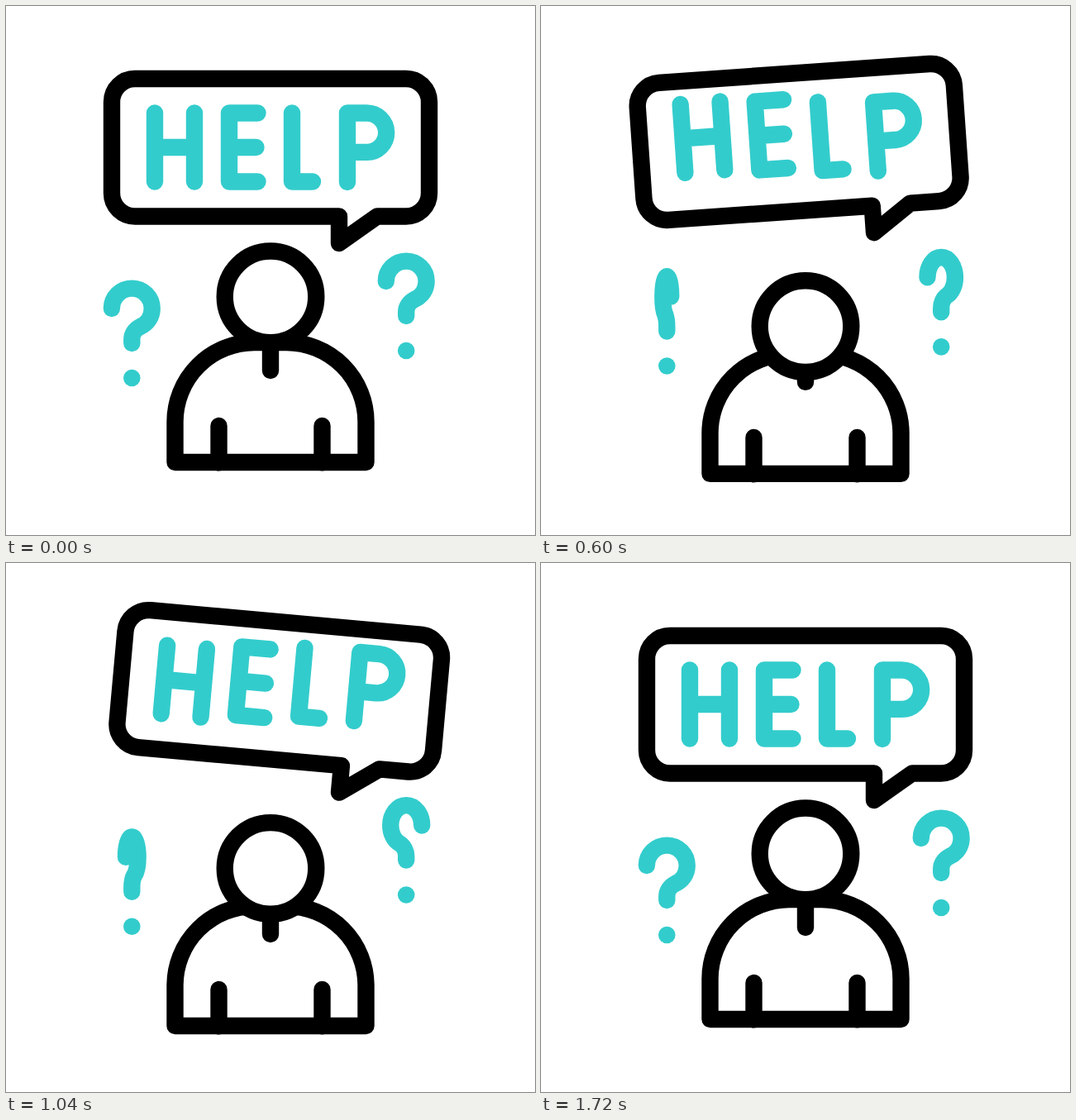
An HTML page that plays this animation: 640x640 px, repeating every 2000 ms.

```html
<!DOCTYPE html>
<html lang="en">
<head>
<meta charset="utf-8">
<title>Help</title>
<style>
  html, body { margin: 0; width: 100%; height: 100%; overflow: hidden; background: #fff; }
  svg { display: block; width: 100%; height: 100%; }

  .ink, .tint { fill: none; stroke-width: 20.4; stroke-linecap: round; stroke-linejoin: round; }
  .ink { stroke: #000; }
  .tint { stroke: #3cc; }
  .dot { fill: #3cc; stroke: none; }

  .bubble, .hop, .head, .body, .mark, .hook {
    animation: 2s cubic-bezier(.333, 0, .667, 1) var(--delay, 0s) infinite;
  }
  .bubble { transform-origin: 403px 287px; animation-name: lift, tilt; }
  .hop { animation-name: hop; }
  .head { animation-name: nod; }
  .body { animation-name: sink; }
  .mark { animation-name: bob; }
  .hook {
    animation-name: flip;
    d: path("M-24.4 0C-24.4 -13.5 -13.5 -24.4 0 -24.4C13.5 -24.4 24.4 -13.5 24.4 0C24.4 10 18.5 18.5 10 22C4 25 0 31 0 37L0 42");
  }

  @keyframes lift {
    0%, 7.25%, 73%, 100% { translate: 0 0; }
    31.75%, 41% { translate: 0 -13px; }
  }
  @keyframes tilt {
    0%, 74.5%, 100% { rotate: 0deg; }
    24%, 25.5% { rotate: -4.9deg; }
    50%, 53% { rotate: 5.15deg; }
  }
  @keyframes hop {
    0%, 8%, 55.5%, 100% { translate: 0 0; }
    29%, 35% { translate: 0 -13.7px; }
  }
  @keyframes nod {
    0%, 9%, 64%, 100% { translate: 0 0; }
    31%, 39.75% { translate: 0 36px; }
  }
  @keyframes sink {
    0%, 9%, 65.75%, 100% { translate: 0 0; }
    31%, 40.75% { translate: 0 14px; }
  }
  @keyframes bob {
    0%, 9%, 67.25%, 100% { translate: 0 0; }
    34%, 42.25% { translate: 0 -15.5px; }
  }
  /* The hook mirrors about its stem while the stroke keeps its weight. */
  @keyframes flip {
    0%, 8%, 68%, 100% {
      d: path("M-24.4 0C-24.4 -13.5 -13.5 -24.4 0 -24.4C13.5 -24.4 24.4 -13.5 24.4 0C24.4 10 18.5 18.5 10 22C4 25 0 31 0 37L0 42");
      animation-timing-function: ease-in;
    }
    38% {
      d: path("M24.4 0C24.4 -13.5 13.5 -24.4 0 -24.4C-13.5 -24.4 -24.4 -13.5 -24.4 0C-24.4 10 -18.5 18.5 -10 22C-4 25 0 31 0 37L0 42");
      animation-timing-function: ease-out;
    }
  }
</style>
</head>
<body>
<svg viewBox="0 0 640 640" role="img" aria-label="HELP">
  <g class="bubble">
    <path class="ink" d="M156 88H484a28 28 0 0 1 28 28V226.5a28 28 0 0 1-28 28H449L403 287V254.5H156a28 28 0 0 1-28-28V116a28 28 0 0 1 28-28Z"/>
    <g class="tint">
      <path class="hop" d="M180 129.5V212.5M228 129.5V212.5M180 171H228"/>
      <path class="hop" style="--delay:.148s" d="M304.5 129.5H270V212.5H304.5M270 171H302.5"/>
      <path class="hop" style="--delay:.275s" d="M346 129.5V212.5H371"/>
      <path class="hop" style="--delay:.438s" d="M413 213V129.5H436.5a23.7 23.7 0 0 1 0 47.4H413"/>
    </g>
  </g>

  <g class="ink body">
    <path d="M204.5 552V503a96 96 0 0 1 96-96H339.5a96 96 0 0 1 96 96V552Z"/>
    <path d="M320 407V441M257.5 508V552.4M382.5 508V552.4"/>
  </g>
  <circle class="ink head" cx="320" cy="351.8" r="55.3" style="fill:#fff"/>

  <g class="tint" transform="translate(152.3 366)">
    <g class="mark">
      <path class="hook"/>
      <circle class="dot" cy="84" r="10.3"/>
    </g>
  </g>
  <g class="tint" transform="translate(484.2 333)" style="--delay:.24s">
    <g class="mark">
      <path class="hook"/>
      <circle class="dot" cy="84" r="10.3"/>
    </g>
  </g>
</svg>
</body>
</html>
```
